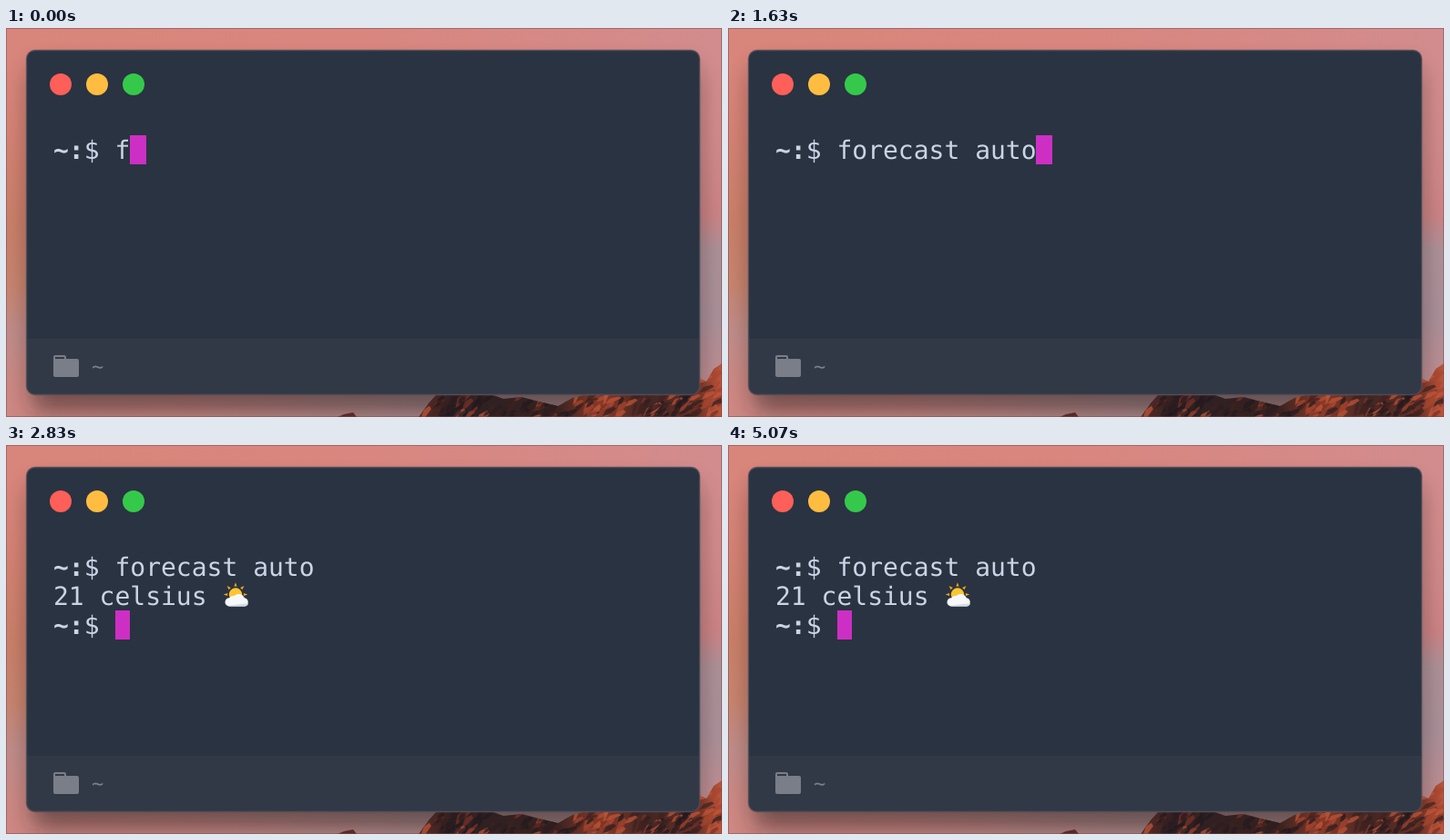
Write an HTML page that moves like this. It is 786 px wide and 428 px high and loops after 5110 ms.

```html
<!DOCTYPE html>
<html lang="en">
<head>
<meta charset="utf-8">
<title>Terminal forecast</title>
<style>
html, body { margin: 0; width: 100%; height: 100%; overflow: hidden; background: #d2857e; }
svg { display: block; width: 786px; height: 428px; }
text {
  font-family: "DejaVu Sans Mono", "Liberation Mono", monospace;
  font-size: 28px;
  fill: #c9d4e6;
  white-space: pre;
  text-rendering: geometricPrecision;
}
.home { font-weight: bold; }
#path { font-size: 22px; fill: #7c808a; }
</style>
</head>
<body>
<svg viewBox="0 0 786 428">
  <defs>
    <linearGradient id="sky" x2="1" y2="0">
      <stop offset="0" stop-color="#d8857b"/>
      <stop offset=".5" stop-color="#d9867f"/>
      <stop offset="1" stop-color="#d28c8d"/>
    </linearGradient>
    <linearGradient id="leftHaze" x2="0" y2="1">
      <stop offset=".1" stop-color="#cf7f6c" stop-opacity="0"/>
      <stop offset=".5" stop-color="#c97f69"/>
      <stop offset=".66" stop-color="#c7846f"/>
      <stop offset=".78" stop-color="#bf8c89"/>
      <stop offset=".95" stop-color="#cf8883"/>
    </linearGradient>
    <linearGradient id="rightHaze" x2="0" y2="1">
      <stop offset=".1" stop-color="#d28a88" stop-opacity="0"/>
      <stop offset=".48" stop-color="#cb8385"/>
      <stop offset=".57" stop-color="#ac9097"/>
      <stop offset=".74" stop-color="#a98f98"/>
      <stop offset=".88" stop-color="#bb8d92"/>
    </linearGradient>
    <linearGradient id="lowHaze">
      <stop offset="0" stop-color="#d08883"/>
      <stop offset=".25" stop-color="#cc8a87"/>
      <stop offset=".6" stop-color="#b28d8f"/>
    </linearGradient>
    <linearGradient id="rock">
      <stop offset="0" stop-color="#5c2a23"/>
      <stop offset=".12" stop-color="#2d2023"/>
      <stop offset=".45" stop-color="#37211f"/>
      <stop offset=".6" stop-color="#8a3a27"/>
      <stop offset=".75" stop-color="#3f2523"/>
      <stop offset=".92" stop-color="#6b3024"/>
      <stop offset="1" stop-color="#c0553a"/>
    </linearGradient>
    <filter id="blur" x="-10%" y="-20%" width="120%" height="140%">
      <feGaussianBlur stdDeviation="13"/>
    </filter>
    <clipPath id="ridge">
      <path id="ridgeLine" d="M453 428 464 413 472 404H535L546 408 566 406 585 411 606 416 622 407 634 404H700L745 390 762 386 769 389 777 375 786 369V428Z"/>
    </clipPath>
  </defs>

  <rect width="786" height="428" fill="url(#sky)"/>
  <rect width="24" height="428" fill="url(#leftHaze)"/>
  <rect x="760" width="26" height="428" fill="url(#rightHaze)"/>
  <rect x="24" y="400" width="736" height="28" fill="url(#lowHaze)"/>
  <rect x="28" y="44" width="730" height="378" rx="10" fill="#1c1218" opacity=".52" filter="url(#blur)"/>
  <use href="#ridgeLine" fill="url(#rock)"/>
  <g id="facets" clip-path="url(#ridge)"></g>
  <path d="M364 428 371 425 381 423 385 428Z" fill="#5a2a27"/>
  <rect x=".5" y=".5" width="785" height="427" fill="none" stroke="#744b50" stroke-opacity=".5"/>

  <rect x="22.5" y="24.5" width="739" height="379" rx="9.5" fill="#2a3341"/>
  <path d="M23 342H761V394a9 9 0 0 1-9 9H32a9 9 0 0 1-9-9Z" fill="#323946"/>
  <rect x="22.5" y="24.5" width="739" height="379" rx="9.5" fill="none" stroke="#57505a" stroke-opacity=".8" stroke-width="1.4"/>
  <circle cx="60" cy="62" r="12" fill="#fe5f58"/>
  <circle cx="100" cy="62" r="12" fill="#febd41"/>
  <circle cx="140" cy="62" r="12" fill="#35c94b"/>

  <g fill="#7a7e88">
    <path d="M52 365V362q0-2 2-2H64q2 0 2 2v2H78q2 0 2 2v16q0 2-2 2H54q-2 0-2-2Z"/>
    <path d="M54 362H64V364H54Z" fill="#323946"/>
  </g>
  <text id="path" x="94" y="380">~</text>

  <rect id="cursor" height="32" fill="#cd2fc4"/>
  <g id="lines"></g>

  <g id="weather">
    <g id="rays" fill="#f5a51d"></g>
    <circle cx="252" cy="164.5" r="7.2" fill="#fcc530"/>
    <path d="M245 177.5a4.6 4.6 0 0 1 .2-9.2 5 5 0 0 1 5.2-2.3 7 7 0 0 1 11.4 2.2 4.8 4.8 0 0 1 .6 9.3Z" fill="#f7f8fa"/>
    <path d="M244 177q9-2 22-2.5-1 3-4 3H246Z" fill="#d5dce5"/>
  </g>
</svg>
<script>
const LOOP = 5110;
const LEFT = 52, TOP = 118, ROW = 32, BASELINE = 144, ADVANCE = 16.857;
const HOME = "~:";
const PROMPT = HOME + "$ ";
const COMMAND = "forecast auto";
const KEYS = [0, 130, 230, 330, 430, 530, 630, 730, 900, 1030, 1160, 1300, 1430];
const ENTER = 1730, FETCH = 1900, SPIN = 100, DONE = 2700;

const $ = id => document.getElementById(id);

function add(parent, tag, attrs) {
  const el = document.createElementNS("http://www.w3.org/2000/svg", tag);
  for (const key in attrs) el.setAttribute(key, attrs[key]);
  parent.append(el);
  return el;
}

// Broken rock faces, lit and shaded at random
let seed = 17;
const rand = () => (seed = seed * 16807 % 2147483647) / 2147483647;
const pick = list => list[Math.floor(rand() * list.length)];
const dark = ["#21191f", "#2b1d21", "#3d2220"];
const lit = ["#7a3325", "#a8462f", "#c4573a"];
for (let i = 0; i < 190; i++) {
  const x = 450 + rand() * 336;
  const edge = x > 755;
  const y = edge ? 368 + rand() * 60 : 402 + rand() * 26;
  const w = 3 + rand() * 7, h = 3 + rand() * 7;
  const sunny = edge ? .62 : x > 620 && x < 700 ? .5 : .25;
  add($("facets"), "path", {
    d: `M${x} ${y}l${w} ${-h * .5} ${w * .3} ${h * .4} ${-w} ${h} ${-w * .8} ${h * .3}Z`,
    fill: pick(rand() < sunny ? lit : dark),
    opacity: .7
  });
}

for (let i = 0; i < 8; i++) {
  add($("rays"), "path", {
    d: "M250.4 155.6 252 151.2 253.6 155.6Z",
    transform: `rotate(${i * 45} 252 164.5)`
  });
}

const lines = [0, 1, 2].map(i => {
  const text = add($("lines"), "text", { x: LEFT, y: BASELINE + i * ROW });
  return { home: add(text, "tspan", { class: "home" }), rest: add(text, "tspan") };
});

function screen(t) {
  if (t < ENTER) return [PROMPT + COMMAND.slice(0, KEYS.filter(k => k <= t).length)];
  const first = PROMPT + COMMAND;
  if (t < FETCH) return [first, ""];
  if (t < DONE) return [first, "Fetching " + "|/-\\"[Math.floor((t - FETCH) / SPIN) % 4]];
  return [first, "21 celsius ", PROMPT];
}

const snap = x => 2 * Math.round(x / 2);

function draw(t) {
  const rows = screen(t);
  lines.forEach((line, i) => {
    const row = rows[i] || "";
    const prompt = row.startsWith(HOME);
    line.home.textContent = prompt ? HOME : "";
    line.rest.textContent = prompt ? row.slice(HOME.length) : row;
  });
  const last = rows.length - 1;
  const x = LEFT + rows[last].length * ADVANCE;
  const cursor = $("cursor");
  cursor.setAttribute("x", snap(x));
  cursor.setAttribute("y", TOP + last * ROW);
  cursor.setAttribute("width", snap(x + ADVANCE) - snap(x));
  $("weather").style.display = t < DONE ? "none" : "";
}

const start = performance.now();
function tick() {
  draw((performance.now() - start) % LOOP);
  requestAnimationFrame(tick);
}
tick();
</script>
</body>
</html>
```
